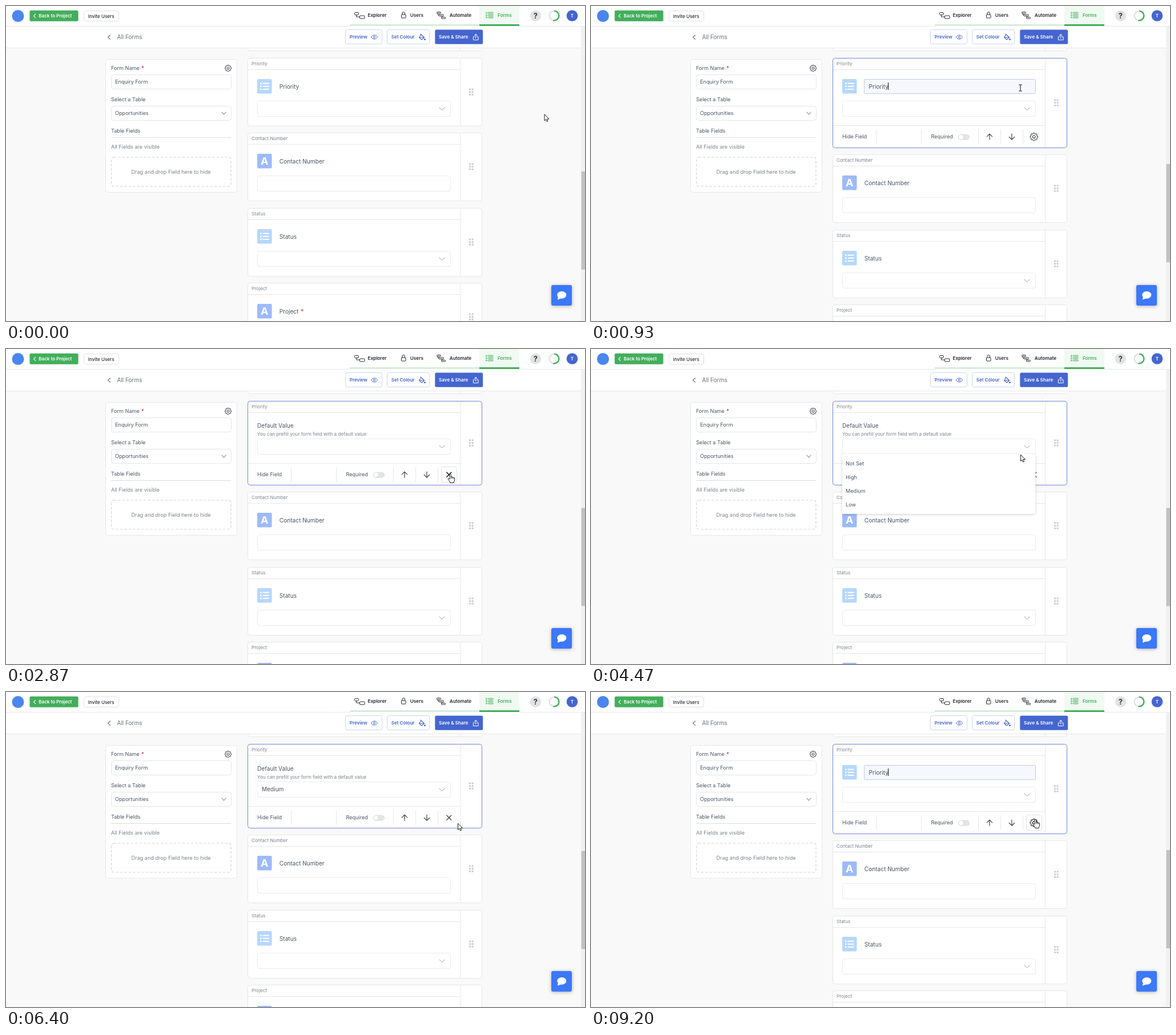
An HTML page with a canvas for the animation above (9.39 s loop, 1014 by 552 pixels).

```html
<!DOCTYPE html>
<html lang="en">
<head>
<meta charset="utf-8">
<title>Form builder</title>
<style>
html, body { margin: 0; width: 100%; height: 100%; overflow: hidden; background: #f9f9f9; }
canvas { display: block; width: 1014px; height: 552px; }
</style>
</head>
<body>
<canvas id="stage" width="1014" height="552"></canvas>
<script>
const c = document.getElementById('stage').getContext('2d');
const LOOP = 9390, TICK = 1000 / 15;
const CLICK = 733, OPEN = 2266, MENU = 3533, PICK = 5400, CLOSE = 7000;
const GREEN = '#43ae5c', BLUE = '#4565cf', FOCUS = '#6f89db';
const LINE = '#e6e7e9', FIELD = '#ebecee', INK = '#4b5563', DARK = '#25292e', MUTE = '#7c828b';

// Pointer hotspot: time, x, y
const track = [
  [0, 943, 190], [533, 752, 143.5], [1200, 752, 143.5], [1600, 784, 234], [1800, 784, 234], [2133, 779, 231],
  [2800, 779, 231], [2866, 778, 219], [3266, 755, 180], [4400, 755, 180], [4466, 752.5, 185.5], [5000, 477, 255],
  [6066, 477, 255], [6400, 791.5, 230.5], [6666, 780, 225], [6866, 778, 223]
];

const clamp = v => Math.max(0, Math.min(1, v));
const ease = v => { v = clamp(v); return v * v * (3 - 2 * v); };
const inside = (p, x, y, w, h) => p.x >= x && p.x < x + w && p.y >= y && p.y < y + h;

function pointerAt(t) {
  let i = 0;
  while (i < track.length - 2 && t >= track[i + 1][0]) i++;
  const [t0, x0, y0] = track[i], [t1, x1, y1] = track[i + 1];
  const k = ease((t - t0) / (t1 - t0));
  return { x: x0 + (x1 - x0) * k, y: y0 + (y1 - y0) * k };
}

function text(s, x, y, size, color = INK, weight = 400, align = 'left') {
  c.font = `${weight} ${size}px Inter, sans-serif`;
  c.fillStyle = color;
  c.textAlign = align;
  c.fillText(s, x, y + size * 0.36);
}

function rect(x, y, w, h, color) {
  c.fillStyle = color;
  c.fillRect(x, y, w, h);
}

function box(x, y, w, h, r, fill, stroke, lw = 1) {
  const o = stroke ? 0.5 : 0;
  c.beginPath();
  c.roundRect(x + o, y + o, w, h, r);
  if (fill) { c.fillStyle = fill; c.fill(); }
  if (stroke) { c.strokeStyle = stroke; c.lineWidth = lw; c.stroke(); }
}

function softBox(x, y, w, h, r, fill, stroke, shadow, blur) {
  c.save();
  c.shadowColor = shadow;
  c.shadowBlur = blur;
  c.shadowOffsetY = 1;
  box(x, y, w, h, r, fill);
  c.restore();
  if (stroke) box(x, y, w, h, r, null, stroke);
}

function stroke(d, x, y, color, lw = 1) {
  c.save();
  c.translate(x, y);
  c.strokeStyle = color;
  c.lineWidth = lw;
  c.lineCap = c.lineJoin = 'round';
  c.stroke(new Path2D(d));
  c.restore();
}

function disc(x, y, r, color) {
  c.beginPath();
  c.arc(x, y, r, 0, 7);
  c.fillStyle = color;
  c.fill();
}

function ring(x, y, r, color, lw, a = 0, b = Math.PI * 2) {
  c.beginPath();
  c.arc(x, y, r, a, b);
  c.strokeStyle = color;
  c.lineWidth = lw;
  c.stroke();
}

function gear(x, y, r, color) {
  c.beginPath();
  for (let i = 0; i < 64; i++) {
    const a = i * Math.PI / 32, q = r * (0.88 + 0.1 * Math.cos(8 * a));
    c.lineTo(x + q * Math.cos(a), y + q * Math.sin(a));
  }
  c.closePath();
  c.strokeStyle = color;
  c.lineWidth = 1.1;
  c.lineJoin = 'round';
  c.stroke();
  ring(x, y, r * 0.34, color, 1.1);
}

const chevron = (x, y) => stroke('M-4.5-2L0 2.5L4.5-2', x, y, '#979ca3', 1);

function field(y) {
  softBox(440, y, 338, 27, 4, '#fff', FIELD, 'rgba(0,0,0,.04)', 2);
}

function select(y, value = '') {
  field(y);
  chevron(763.5, y + 14);
  text(value, 448, y + 13.5, 10.1);
}

function fieldIcon(list, y) {
  box(440, y, 25.5, 25.5, 2, list ? '#b6d7fd' : '#9dbafa');
  if (!list) return text('A', 452.8, y + 13, 18, '#fff', 700, 'center');
  for (let i = 0; i < 3; i++) {
    rect(445, y + 6.4 + i * 5.1, 2.6, 2.6, '#fff');
    rect(449.5, y + 6.7 + i * 5.1, 11, 2, '#fff');
  }
}

function cardFrame(y, h, label, hot) {
  box(423, y, 410, h, 4, '#fff', hot ? FOCUS : LINE);
  rect(424, y + 20, 371, 1, LINE);
  rect(795, y + 1, 1, h - 1, LINE);
  text(label, 430, y + 10.2, 8.15, MUTE);
  for (let i = 0; i < 6; i++) disc(812.5 + (i % 2) * 4.6, y + h / 2 - 4.4 + (i >> 1) * 4.6, 1.75, '#cccdd0');
}

function card(y, label, list, hot, required) {
  cardFrame(y, 119, label, hot);
  fieldIcon(list, y + 37);
  text(label, 478.8, y + 50, 10.15);
  if (required) text('*', 516, y + 50, 10.15, '#d63a3a', 600);
  if (list) select(y + 75);
  else field(y + 75);
}

function toolbar(y, config, p) {
  const m = y + 20.2;
  rect(424, y, 371, 1, LINE);
  text('Hide Field', 440, m, 9.1);
  for (const x of [499, 578, 678, 717, 756]) rect(x, y + 7, 1, 26, LINE);
  text('Required', 595.5, m, 9.1);
  box(643, m - 4.5, 19, 9, 4.5, '#e4e5e7', '#d6d8db', 0.8);
  disc(648, m + 0.4, 4.4, '#fff');
  ring(648, m + 0.4, 4.4, '#cfd1d4', 0.7);
  stroke('M0 5V-5M-4.7-.3L0-5L4.7-.3', 698, m, '#3c4249', 1.2);
  stroke('M0-5V5M-4.7.3L0 5L4.7.3', 737, m, '#3c4249', 1.2);
  const hot = inside(p, 762, y + 7, 28, 27);
  if (hot) box(762, Math.round(y + 6), 27, 27, 3, '#fff', '#e0e2e4');
  const ink = hot ? '#15181b' : '#3c4249';
  if (config) stroke('M-4-4L4 4M4-4L-4 4', 775.8, m, ink, hot ? 1.6 : 1.3);
  else gear(775.8, m, 7, ink);
}

function activeCard(t, s, p) {
  const y = 91;
  if (s.mode === 'view') return card(y, 'Priority', true, inside(p, 423, y, 411, 120));
  cardFrame(y, s.h, 'Priority', true);
  c.save();
  c.beginPath();
  c.rect(424, y + 1, 409, s.h - 1);
  c.clip();
  if (s.mode === 'config') {
    text('Default Value', 440, 134.6, 10.1);
    text('You can prefill your form field with a default value', 440, 149, 8.17, MUTE);
    select(157, t >= PICK - 1 ? 'Medium' : '');
    toolbar(200, true, p);
  } else {
    fieldIcon(true, y + 37);
    box(478, 128, 300, 25, 1, '#f6f8fe', '#c0caef');
    text('Priority', 486.6, 141, 10.15);
    const since = t - (t < OPEN ? CLICK : 7066);
    if (since % 1066.7 < 533) rect(520, 134, 1, 13, '#000');
    select(y + 75);
    toolbar(209, false, p);
  }
  c.restore();
}

function menu() {
  softBox(440, 184, 338.5, 105, 2, '#fff', null, 'rgba(0,0,0,.2)', 4);
  ['Not Set', 'High', 'Medium', 'Low'].forEach((s, i) => text(s, 446, 201.2 + i * 23.7, 9.15));
}

function sidePanel() {
  box(174, 93, 230, 233, 4, '#fff', LINE);
  text('Form Name', 184, 109, 9.1);
  text('*', 237, 109, 9.1, '#d63a3a', 600);
  gear(389, 109, 5.8, '#4b5563');
  box(184, 120, 210, 25, 4, '#fff', '#e3e5e7');
  text('Enquiry Form', 191, 133.2, 9.15);
  text('Select a Table', 184, 164, 9.1);
  box(184, 175, 210, 25, 4, '#fff', '#e3e5e7');
  text('Opportunities', 191, 188.2, 9.15);
  stroke('M-3.5-2L0 2L3.5-2', 381.5, 188, '#7c828b', 1.1);
  text('Table Fields', 184, 219, 9.1);
  rect(184, 230, 210, 1, '#dadcdf');
  text('All Fields are visible', 184, 246.6, 9.15, MUTE);
  c.setLineDash([4.5, 3]);
  box(184, 264.5, 209.5, 51, 4, null, '#d2d4d7', 1.2);
  c.setLineDash([]);
  text('Drag and drop Field here to hide', 289, 291, 9.15, MUTE, 400, 'center');
}

function header() {
  rect(0, 0, 1014, 35, '#fff');
  disc(21, 17.5, 10.5, '#4a86ee');
  box(41.4, 7.7, 85.2, 19, 2.5, GREEN);
  stroke('M1.5-3L-1.5 0L1.5 3', 50, 17.3, '#fff', 1.2);
  text('Back to Project', 57.3, 17.3, 8, '#fff', 600);
  box(136, 8, 61, 18, 3, '#fff', '#dfe1e3');
  text('Invite Users', 143.7, 17.6, 8.1, DARK, 500);

  rect(829, 0, 70, 35, '#f0f9f2');
  rect(602, 32, 227, 3, '#d5edda');
  rect(829, 32, 70, 3, GREEN);
  rect(0, 35, 602, 1, LINE);
  rect(899, 35, 115, 1, LINE);
  box(610, 11, 7, 4, 1, null, DARK);
  box(619, 16.5, 8.5, 5, 1, null, DARK);
  stroke('M0 0V3.5H5', 613.5, 15.5, DARK);
  text('Explorer', 633.5, 16.3, 8.2, DARK, 600);
  box(692, 14.5, 7.5, 6, 1, null, DARK);
  stroke('M-2.3 0V-2A2.3 2.3 0 0 1 2.3-2V0', 696.2, 14.8, DARK);
  text('Users', 707.8, 16.3, 8.2, DARK, 600);
  box(754, 10, 7, 2.5, 1, null, DARK);
  box(757, 14.5, 9, 2.5, 1, null, DARK);
  box(762, 19, 7, 2.5, 1, null, DARK);
  stroke('M0 0V3H3M7 5V8', 756, 12.5, DARK, 0.8);
  text('Automate', 776.7, 16.3, 8.2, DARK, 600);
  for (let i = 0; i < 3; i++) {
    box(840, 10.5 + i * 4, 2, 2, 0.5, null, GREEN, 0.9);
    box(844, 10.5 + i * 4, 8.5, 2, 0.5, null, GREEN, 0.9);
  }
  text('Forms', 861, 16.3, 8.2, GREEN, 600);

  disc(927.5, 17, 9.6, '#e1e2e4');
  text('?', 927.5, 17.2, 13, '#34383d', 700, 'center');
  ring(960, 17, 8.4, '#dfe1e3', 2.4);
  ring(960, 17, 8.4, GREEN, 2.4, -Math.PI / 2, Math.PI * 0.56);
  disc(991.5, 17, 9.8, BLUE);
  text('T', 991.5, 17.2, 8.2, '#fff', 600, 'center');
}

function subheader() {
  rect(0, 36, 1007, 37, '#fff');
  rect(0, 73, 1007, 1, LINE);
  stroke('M2-3.7L-2 0L2 3.7', 180.5, 54.7, '#5f6670', 1.1);
  text('All Forms', 194.5, 54.8, 10, '#6b727c');
  box(594, 41, 64, 25, 3, '#fff', '#ccd5f2');
  text('Preview', 601.7, 54, 8.05, BLUE, 600);
  stroke('M-5.5 0C-3-4.8 3-4.8 5.5 0C3 4.8-3 4.8-5.5 0Z', 645, 54.5, BLUE);
  ring(645, 54.5, 1.7, BLUE, 1);
  box(667, 41, 74, 25, 3, '#fff', '#ccd5f2');
  text('Set Colour', 674.7, 54, 8.05, BLUE, 600);
  stroke('M-1.5-4L4 1L-.5 5L-5 1ZM-1.5-4L-2.5-5M-5 1H4', 728.5, 54, BLUE, 1.1);
  disc(733.5, 58.5, 1.5, BLUE);
  box(751.3, 41.4, 83.9, 25.3, 2.5, BLUE);
  text('Save & Share', 758, 54, 8.1, '#fff', 600);
  stroke('M-2-.5H-4.3V5H4.3V-.5H2M0 2V-5M-2.5-2.7L0-5L2.5-2.7', 822.7, 54.5, '#fff');
}

function chat() {
  softBox(955, 489, 36, 36, 3, '#3b78fa', null, 'rgba(0,0,0,.3)', 6);
  c.beginPath();
  c.ellipse(973.3, 506.3, 8, 6.4, 0, 0, 7);
  c.fillStyle = '#fff';
  c.fill();
  c.fill(new Path2D('M967 509L965.8 514.8L973 512Z'));
}

function pointer(p, kind) {
  if (kind === 'text') {
    stroke('M-2.5-5.5H-.6L0-5L.6-5.5H2.5M0-5V5M-2.5 5.5H-.6L0 5L.6 5.5H2.5', p.x, p.y, '#111', 1);
    return;
  }
  const d = kind === 'hand'
    ? 'M-1.3 1.2Q-1.2 0 0 0Q1.2 0 1.3 1.2V5.2Q2.8 4.4 3.7 5.7Q5.2 5.1 5.8 6.4Q7.6 6.2 7.6 8V10.8Q7.4 12.5 6.3 13.6V15.5H-.3V14.1L-3.5 9.8Q-4.5 8.2-3.3 7.7Q-2.5 7.5-1.3 9Z'
    : 'M0 0V11L2.5 8.8L4.2 12.5L6 11.7L4.4 8H7.6Z';
  const path = new Path2D(d);
  c.save();
  c.translate(p.x, p.y);
  c.fillStyle = '#fff';
  c.fill(path);
  c.restore();
  stroke(d, p.x, p.y, '#111', 0.95);
  if (kind === 'hand') stroke('M1.3 5.2V8M3.7 5.8V8M5.8 6.5V8.2', p.x, p.y, '#111', 0.8);
}

function stateAt(t) {
  if (t < CLICK - 1) return { mode: 'view', h: 119, thumb: 290 };
  if (t >= OPEN - 1 && t < CLOSE - 1) return { mode: 'config', h: 147, thumb: 278.5 };
  const k = ease((t - 666) / 266);
  return { mode: 'edit', h: Math.round(119 + 38 * k), thumb: 290 - 13 * k };
}

function pointerKind(p, s, menuOpen) {
  const config = s.mode === 'config';
  if (!config && inside(p, 478, 128, 301, 26)) return 'text';
  if (inside(p, 440, config ? 157 : 167, 339, 27)) return 'hand';
  if (menuOpen && inside(p, 440, 190, 339, 95)) return 'hand';
  if (s.mode !== 'view' && inside(p, 762, config ? 207 : 216, 28, 27)) return 'hand';
  return 'arrow';
}

function draw(now) {
  const t = Math.floor((now % LOOP + 4) / TICK) * TICK;
  const s = stateAt(t), p = pointerAt(t);
  const menuOpen = t >= MENU - 1 && t < PICK - 1;

  rect(0, 0, 1014, 552, '#f9f9f9');
  sidePanel();
  card(-41, 'Name', false);
  activeCard(t, s, p);
  const next = 91 + s.h + 12.3, row = i => Math.round(next + 131.3 * i);
  card(row(0), 'Contact Number', false, t > 5500 && inside(p, 423, row(0), 411, 120));
  card(row(1), 'Status', true);
  card(row(2), 'Project', false, false, true);
  if (menuOpen) menu();
  rect(1007, 36, 7, 516, '#f1f1f1');
  rect(1007.5, s.thumb, 6.5, 172, '#c1c1c1');
  header();
  subheader();
  chat();
  pointer(p, pointerKind(p, s, menuOpen));
}

const start = performance.now();
function frame() {
  draw(performance.now() - start);
  requestAnimationFrame(frame);
}
frame();
</script>
</body>
</html>
```
